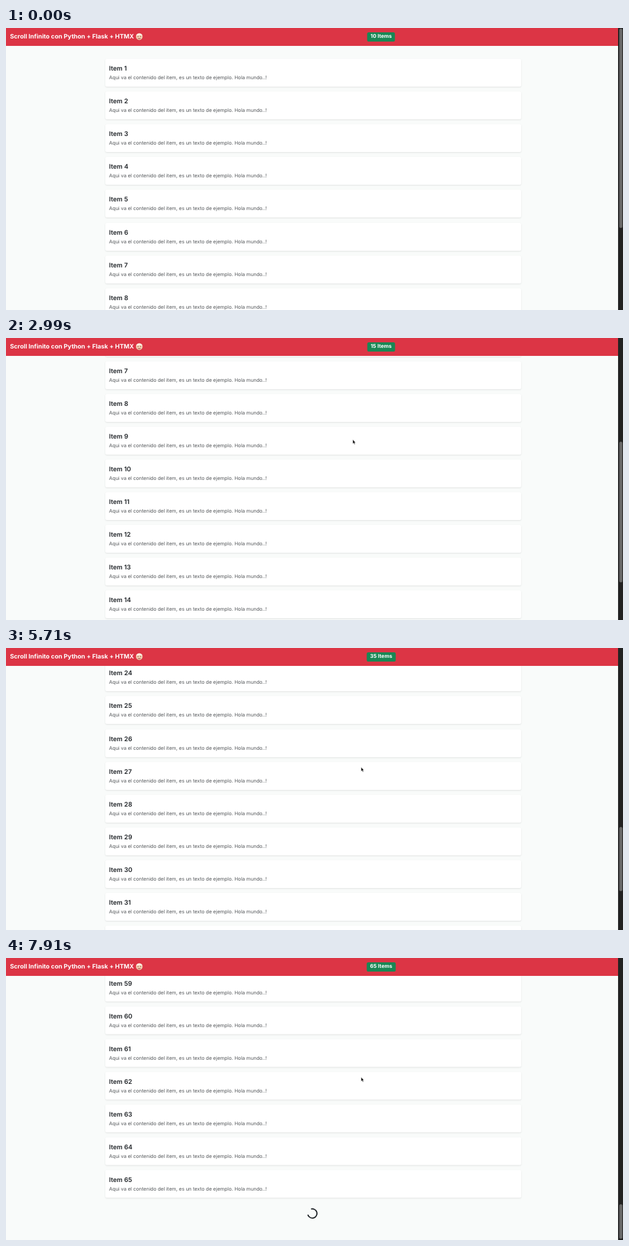
Animation of 1000 by 457 pixels, one loop 8000 ms. Source, as an HTML page:

```html
<!DOCTYPE html>
<html lang="es">
<head>
<meta charset="utf-8">
<title>Scroll infinito</title>
<style>
  html, body { margin: 0; width: 100%; height: 100%; overflow: hidden; }
  body { position: relative; background: #f9fbfa; font-family: Inter, sans-serif; text-rendering: geometricPrecision; }
  body * { position: absolute; white-space: nowrap; }
  #list { left: 0; top: 0; width: 992px; }
  .card { left: 160.5px; width: 674px; height: 45px; border-radius: 2.5px; background: #fff; box-shadow: 0 1px 2.5px rgba(0, 0, 0, .1); }
  .card b { left: 6.5px; top: 10px; font-size: 10.3px; line-height: 12px; font-weight: 600; color: #212529; }
  .card span { left: 6.5px; top: 24px; font-size: 7.97px; line-height: 12px; color: #55585b; }
  #spinner { left: 488px; width: 17px; height: 17px; box-sizing: border-box; border: 2.2px solid #212529; border-right-color: transparent; border-radius: 50%; }
  header { left: 0; top: 0; width: 992px; height: 29px; background: #dc3545; color: #fff; font-weight: 700; }
  #brand { left: 6.5px; top: 8px; font-size: 9.95px; line-height: 13px; }
  #face { left: 210px; top: 8px; }
  #badge { left: 608px; top: 7px; transform: translateX(-50%); padding: 0 5.4px; border-radius: 2.5px; background: #198754; font-size: 8.5px; line-height: 15px; }
  #track { left: 992px; top: 0; width: 8px; height: 457px; background: #222; }
  #thumb { left: 2px; width: 4.5px; border-radius: 2.5px; background: #686868; }
  #cursor { left: 0; top: 0; }
</style>
</head>
<body>
<div id="list"><div id="spinner"></div></div>
<header>
  <div id="brand">Scroll Infinito con Python + Flask + HTMX</div>
  <svg id="face" width="12" height="12">
    <circle cx="6" cy="6" r="5.4" fill="#f0cdb0"/>
    <path d="M.8 4.6a5.4 5.4 0 0 1 10.4 0Q6 2.4.8 4.6" fill="#fff3e8"/>
    <path d="M3 5.8h2M7 5.8h2M3.8 8.6q2.2 1.6 4.4 0" fill="none" stroke="#a0584a" stroke-width="1.1"/>
  </svg>
  <div id="badge"></div>
</header>
<div id="track"><div id="thumb"></div></div>
<svg id="cursor" width="8" height="11">
  <path d="M.5.5v7l1.6-1.4 1.1 2.4 1.2-.6-1.1-2.2h2z" fill="#111" stroke="#fff" stroke-width=".5"/>
</svg>
<script>
const LOOP = 8000, VIEW = 457, PITCH = 53.1, FIRST = 50, BATCH = 5;
const $ = id => document.getElementById(id);

// Progress from 0 to 1 between two times.
const ramp = (t, from, to) => Math.min(1, Math.max(0, (t - from) / (to - from)));

// Slow scrolling first: start, end, distance.
const strokes = [[1860, 2350, 184], [2350, 2990, 147], [3300, 3820, 118.5], [4000, 4690, 157.5], [4790, 4890, 108]];
const loads = [2350, 4000];

// Then a steady rhythm: a batch loads and the page drops to its end.
for (let k = 0; k < 9; k++) {
  const load = 5005 + 340 * k;
  loads.push(load);
  strokes.push([load + 115, load + 185, BATCH * PITCH]);
}

const cards = Array.from({ length: 65 }, (_, i) => {
  const card = document.createElement('div');
  card.className = 'card';
  card.style.top = FIRST + i * PITCH + 'px';
  card.innerHTML = `<b>Item ${i + 1}</b><span>Aqui va el contenido del item, es un texto de ejemplo. Hola mundo..!</span>`;
  $('list').append(card);
  return card;
});

function drawPage(t) {
  const count = 10 + BATCH * loads.filter(time => time <= t).length;
  const y = strokes.reduce((sum, [from, to, distance]) => sum + distance * ramp(t, from, to), 0);
  const scale = VIEW / (110 + PITCH * count);
  cards.forEach((card, i) => card.style.display = i < count ? '' : 'none');
  $('list').style.transform = `translateY(${-y}px)`;
  $('spinner').style.top = FIRST + count * PITCH + 8 + 'px';
  $('spinner').style.transform = `rotate(${90 + (Math.round(t / 100) - 69) * 48}deg)`;
  $('badge').textContent = count + ' Items';
  $('thumb').style.top = y * scale + 1 + 'px';
  $('thumb').style.height = VIEW * scale - 2.5 + 'px';
}

function drawCursor(t) {
  const enter = ramp(t, 160, 530), lift = ramp(t, 2690, 2990), shift = ramp(t, 4000, 4300), settle = ramp(t, 4900, 5500);
  const x = 838 - 276.5 * enter + 13.5 * shift;
  const y = 163 + 6 * enter - 5 * lift + 26 * shift + 2.5 * settle;
  $('cursor').style.display = enter ? '' : 'none';
  $('cursor').style.transform = `translate(${x}px, ${y}px)`;
}

function tick() {
  const t = performance.now() % LOOP;
  drawPage(t);
  drawCursor(t);
  requestAnimationFrame(tick);
}
tick();
</script>
</body>
</html>
```
